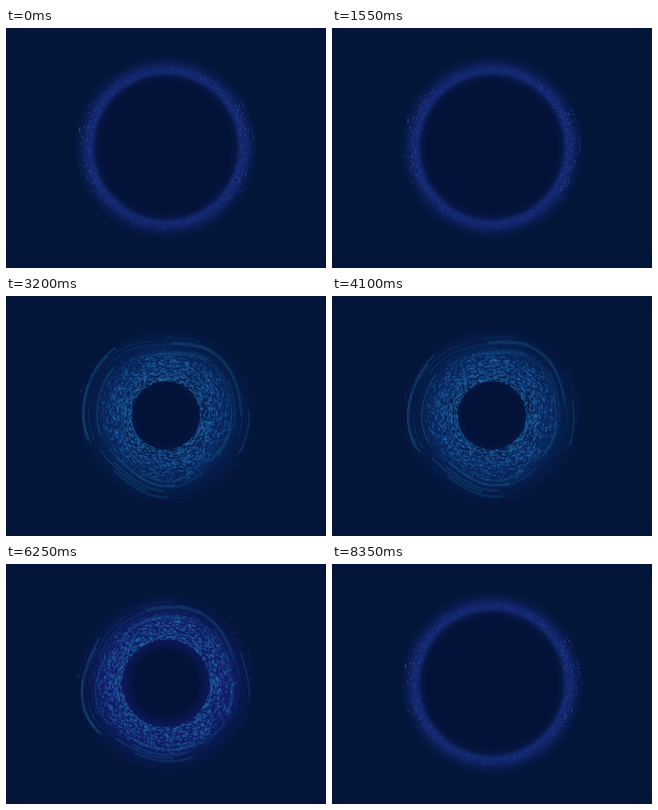
Animation, 400 px wide and 300 px high, one loop 8400 ms. Source, as an HTML page with a canvas:

```html
<!DOCTYPE html>
<html>
<head>
<meta charset="utf-8">
<style>
html, body { margin: 0; width: 100%; height: 100%; overflow: hidden; background: #04153a; }
canvas { display: block; }
</style>
</head>
<body>
<canvas id="stage" width="400" height="300"></canvas>
<script>
const ctx = document.getElementById('stage').getContext('2d');
const LOOP = 8400, STEP = 50, TAU = Math.PI * 2, CX = 200, CY = 149;

let seed = 71;
function rnd() {
  seed = (seed * 16807) % 2147483647;
  return seed / 2147483647;
}
const range = (a, b) => a + (b - a) * rnd();
const many = (n, make) => Array.from({ length: n }, (_, i) => make(i));
const mix = (a, b, p) => a + (b - a) * p;
const blend = (a, b, p) => a.map((v, i) => mix(v, b[i], p));
const rgba = (c, a) => `rgba(${c.map(Math.round).join()},${a})`;
function ease(from, to, x) {
  const p = Math.min(1, Math.max(0, (x - from) / (to - from)));
  return p * p * (3 - 2 * p);
}
const place = (r, a) => [CX + r * Math.cos(a), CY + r * Math.sin(a)];

const BLUE = [52, 82, 192], TEAL = [33, 108, 174];
const BLUE_GLOW = [27, 47, 134], TEAL_GLOW = [12, 50, 116], VIOLET_GLOW = [29, 28, 134];

// The ring closes to a narrow pupil and opens again; colours follow the closing.
function stateAt(t) {
  const close = ease(1700, 3200, t) * (1 - ease(5500, 7700, t));
  const swirl = ease(.38, .75, close), violet = 4 * close * (1 - close);
  return {
    turn: t / LOOP * TAU,
    swirl, violet,
    inner: mix(88, 43, close),
    outer: mix(112, 108, close),
    dot: blend(BLUE, TEAL, swirl),
    glow: blend(blend(BLUE_GLOW, TEAL_GLOW, swirl), VIOLET_GLOW, violet)
  };
}

const dust = many(4600, () => ({
  angle: rnd() * TAU,
  depth: Math.pow(rnd(), 1.2),
  light: range(.2, 1),
  size: range(1, 4.5),
  phase: rnd() * TAU
}));

const sparks = many(84, i => ({
  angle: (i % 2) * Math.PI + range(-.55, .55),
  radius: 101 + (i % 3) * 4.5 + range(-.5, .5),
  light: range(.25, .75)
}));

const arcs = many(26, () => ({
  radius: range(76, 105),
  start: rnd() * TAU,
  sweep: range(.4, 1.7),
  light: range(.2, .6)
}));

const wobble = (a, turn) => 3 * Math.sin(3 * a + 1 + turn) + 1.5 * Math.sin(5 * a);

function drawGlow(s) {
  const from = s.inner - 8 - 10 * s.violet, to = s.outer + 4, width = s.outer - s.inner;
  const g = ctx.createRadialGradient(CX, CY, from, CX, CY, to);
  const stop = (r, a) => g.addColorStop((r - from) / (to - from), rgba(s.glow, a));
  stop(from, 0);
  stop(s.inner, .15 + .4 * s.violet);
  stop(s.inner + width * .25, .65);
  stop(s.inner + width * .5, .55);
  stop(s.inner + width * .75, .25);
  stop(to, 0);
  ctx.fillStyle = g;
  ctx.fillRect(0, 0, 400, 300);
}

function drawDust(s) {
  ctx.strokeStyle = rgba(s.dot, 1);
  for (const d of dust) {
    const a = d.angle + .25 * Math.sin(s.turn + d.depth * 3);
    const r = mix(s.inner, s.outer, d.depth) + s.swirl * d.depth * wobble(a, s.turn);
    const side = Math.cos(a) ** 2;
    const bell = ease(-.1, .35, d.depth) * (1 - ease(.4, 1, d.depth));
    const body = 1 - .9 * ease(.35, .75, d.depth);
    const fade = mix(bell * mix(.28, .75, side), body * .9, s.swirl);
    const half = mix(.5, d.size / 2, s.swirl) / r;
    ctx.globalAlpha = d.light * fade * (.85 + .15 * Math.sin(s.turn * 4 + d.phase));
    ctx.lineWidth = mix(1.8 - .8 * side, 1.2, s.swirl);
    ctx.beginPath();
    ctx.moveTo(...place(r, a - half));
    ctx.lineTo(...place(r, a + half));
    ctx.stroke();
  }
}

// Arcs are thin at the sides, broad and faint at the top and bottom.
function drawArcs(s) {
  const pieces = 24;
  ctx.strokeStyle = '#1b6295';
  for (const arc of arcs) {
    const point = j => {
      const a = arc.start + arc.sweep * j / pieces + .2 * Math.sin(s.turn);
      return place(arc.radius + wobble(a, s.turn), a);
    };
    for (let j = 0; j < pieces; j++) {
      const flat = Math.sin(arc.start + arc.sweep * j / pieces) ** 2;
      ctx.globalAlpha = arc.light * s.swirl * (1 - .4 * flat);
      ctx.lineWidth = 1 + 2.2 * flat;
      ctx.beginPath();
      ctx.moveTo(...point(j));
      ctx.lineTo(...point(j + 1));
      ctx.stroke();
    }
  }
}

function drawSparks(s) {
  ctx.fillStyle = '#4a6ac8';
  for (const p of sparks) {
    const [x, y] = place(p.radius, p.angle + .12 * Math.sin(s.turn));
    ctx.globalAlpha = p.light * (1 - .55 * s.swirl);
    ctx.fillRect(x - .6, y - .6, 1.2, 1.2);
  }
}

function draw(t) {
  const s = stateAt(t);
  ctx.globalAlpha = 1;
  ctx.fillStyle = '#04153a';
  ctx.fillRect(0, 0, 400, 300);
  ctx.fillStyle = '#031238';
  ctx.beginPath();
  ctx.arc(CX, CY, s.inner, 0, TAU);
  ctx.fill();
  drawGlow(s);
  drawDust(s);
  if (s.swirl) drawArcs(s);
  drawSparks(s);
}

const begin = performance.now();
let shown = -1;
function tick() {
  const t = Math.floor((performance.now() - begin) % LOOP / STEP) * STEP;
  if (t !== shown) draw(shown = t);
  requestAnimationFrame(tick);
}
tick();
</script>
</body>
</html>
```
